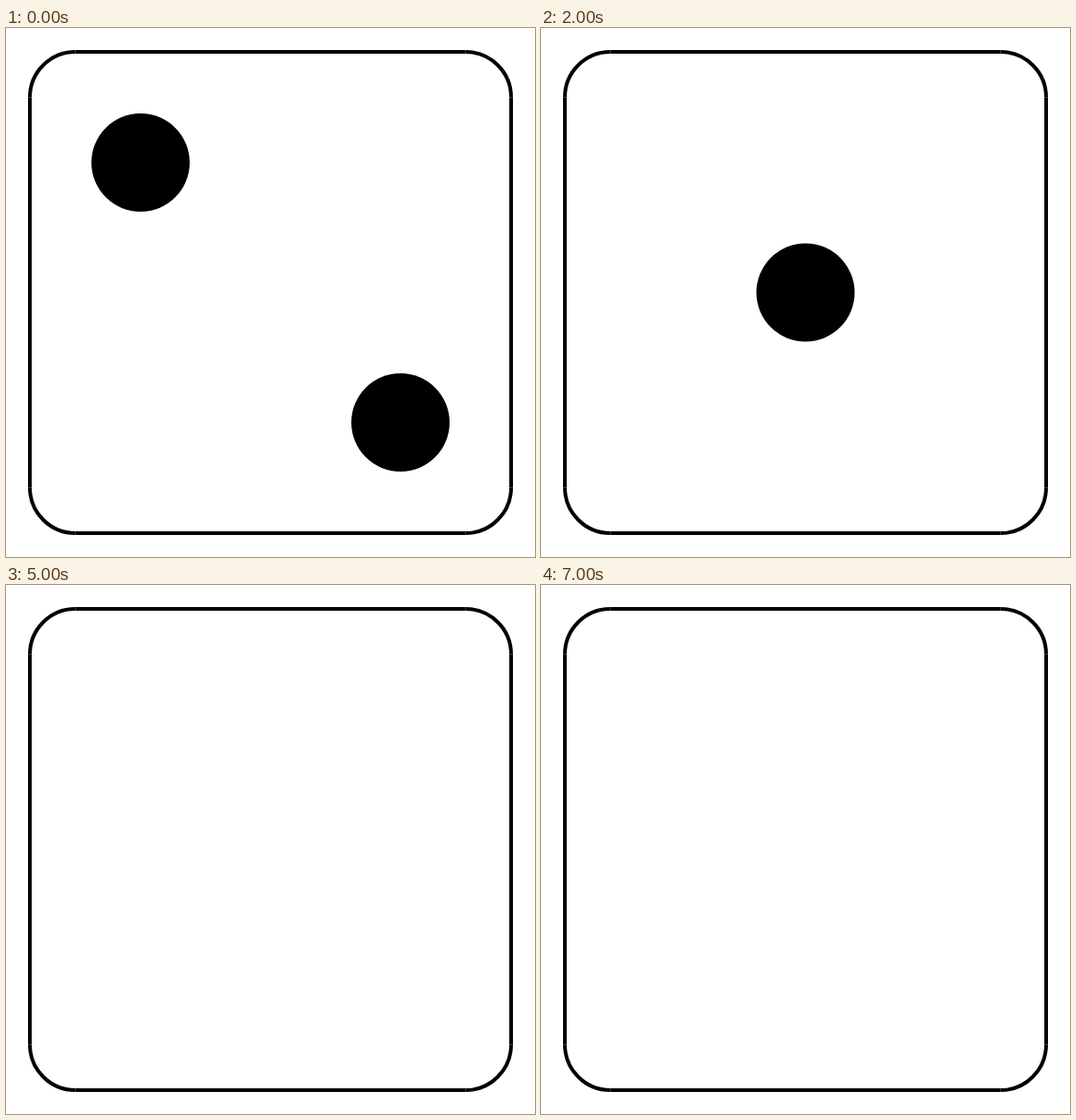
These frames come from a looping animation (576 by 576 pixels, 8000 ms). An HTML page:

```html
<!DOCTYPE html>
<html lang="en">
<head>
<meta charset="utf-8">
<title>Die</title>
<style>
  html, body { margin: 0; width: 100%; height: 100%; overflow: hidden; background: #fff; }
  svg { display: block; width: 576px; height: 576px; }
  .edge { fill: none; stroke: #000; stroke-width: 4; }
  .face { visibility: hidden; animation: show 8s step-end var(--start) infinite; }
  @keyframes show {
    0% { visibility: visible; }
    12.5%, 100% { visibility: hidden; }
  }
</style>
</head>
<body>
<svg viewBox="0 0 576 576">
  <defs>
    <circle id="pip" r="53.5"/>
    <g id="one"><use href="#pip" x="288" y="288"/></g>
    <g id="two">
      <use href="#pip" x="146.5" y="146.5"/>
      <use href="#pip" x="429.5" y="429.5"/>
    </g>
    <g id="four">
      <use href="#two"/>
      <use href="#two" transform="matrix(-1 0 0 1 576 0)"/>
    </g>
    <g id="side">
      <path d="M75.5 26H500.5"/>
      <path d="M500.5 26A49.5 49.5 0 0 1 550 75.5"/>
    </g>
  </defs>
  <g class="edge">
    <use href="#side"/>
    <use href="#side" transform="rotate(90 288 288)"/>
    <use href="#side" transform="rotate(180 288 288)"/>
    <use href="#side" transform="rotate(270 288 288)"/>
  </g>
  <g class="face" style="--start: 0s"><use href="#two"/></g>
  <g class="face" style="--start: 2s"><use href="#one"/></g>
  <g class="face" style="--start: 4s"><use href="#four"/></g>
  <g class="face" style="--start: 6s"><use href="#four"/><use href="#one"/></g>
</svg>
</body>
</html>
```
